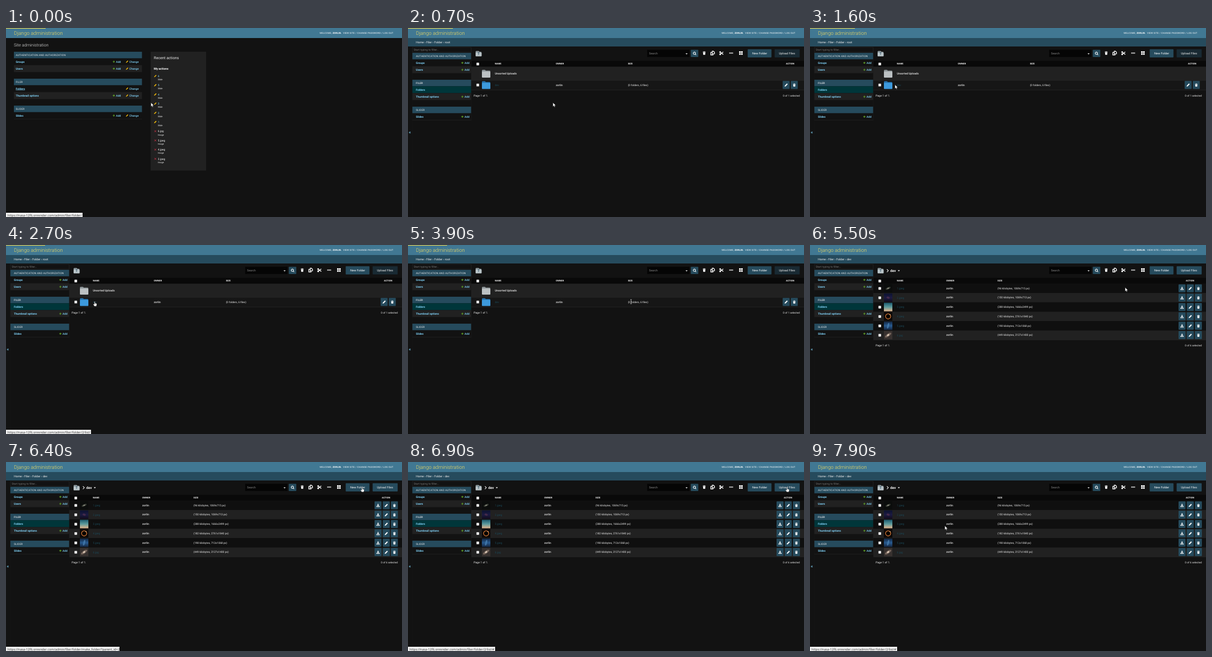
An HTML page that plays this animation: 750 px wide and 358 px high, repeating every 8 s.

```html
<!DOCTYPE html>
<html lang="en">
<head>
<meta charset="utf-8">
<title>Site administration</title>
<style>
html, body { margin: 0; width: 100%; height: 100%; overflow: hidden; background: #121212; }
svg { display: block; width: 100vw; height: 100vh; }
text { font-family: Roboto, sans-serif; text-rendering: geometricPrecision; white-space: pre; }
.url { font-family: "Open Sans", sans-serif; }
</style>
</head>
<body>
<svg id="stage" viewBox="0 0 750 358"></svg>
<script>
const LINK = '#81d4fa', TEXT = '#eeeeee', BAR = '#264b5d', PANEL = '#212121', DIM = '#1b4655';
const USER = 'zorlin';
const LOOP = 8000, STEP = 100;

const rect = (x, y, w, h, fill, extra = '') =>
  `<rect x="${x}" y="${y}" width="${w}" height="${h}" fill="${fill}" ${extra}/>`;

// y is the vertical middle of lower-case text
const text = (x, y, str, { size = 5.2, fill = TEXT, weight = 400, space = 0, extra = '' } = {}) =>
  `<text x="${x}" y="${y + size * 0.35}" font-size="${size}" fill="${fill}" font-weight="${weight}" letter-spacing="${space}" ${extra}>${str}</text>`;

const link = (x, y, str, extra = '') => text(x, y, str, { fill: LINK, weight: 700, extra });
const caps = (x, y, str, weight = 400) => text(x, y, str, { size: 4.8, space: 0.2, weight });
const head = (x, y, str) => text(x, y, str, { size: 4.4, weight: 700 });

// icon outlines in a box from -5 to 5
const fills = {
  pencil: 'M-5 5L-4 1.5 2.5-5 5-2.5-1.5 4Z',
  trash: 'M-4-4h2.5l.5-1h2l.5 1H4v1.2H-4ZM-3.4-2h6.8l-.5 7h-5.8Z',
  load: 'M-1.2-5h2.4v4H4L0 3-4-1h2.8ZM-5 2h2l3 2.2 3-2.2h2v3H-5Z',
  grid: 'M-5-5h4.5v4.5H-5ZM.5-5H5v4.5H.5ZM-5 .5h4.5V5H-5ZM.5 .5H5V5H.5Z',
  dots: 'M-5-1.3h2.6v2.6h-2.6ZM-1.3-1.3h2.6v2.6h-2.6ZM2.4-1.3H5v2.6H2.4Z',
  plus: 'M-1-5h2v4h4v2h-4v4h-2v-4h-4v-2h4Z',
  caret: 'M-5-2.5H5L0 3Z'
};
const strokes = {
  search: 'M2 2L5 5M3-1a4 4 0 1 1-8 0a4 4 0 1 1 8 0',
  copy: 'M-1-5H2L5-2V2H-1ZM-1-2H-5V5H1V2',
  cut: 'M-2.5-2L5 3.5M-2.5 2L5-3.5M-2-3a1.5 1.5 0 1 1-3 0a1.5 1.5 0 1 1 3 0M-2 3a1.5 1.5 0 1 1-3 0a1.5 1.5 0 1 1 3 0',
  cross: 'M-4-4L4 4M4-4L-4 4',
  chevron: 'M-2.5-5L2.5 0-2.5 5'
};
const icon = (name, x, y, size, color = '#fff') =>
  `<path transform="translate(${x} ${y}) scale(${size / 10})" ` + (fills[name]
    ? `d="${fills[name]}" fill="${color}"/>`
    : `d="${strokes[name]}" fill="none" stroke="${color}" stroke-width="1.9"/>`);

const add = (x, y) => icon('plus', x, y, 4.2, '#70bf2b') + text(x + 4, y, 'Add', { fill: LINK, weight: 500 });
const change = y => icon('pencil', 229.3, y, 4.4, '#efb80b') + text(233.5, y, 'Change', { fill: LINK, weight: 500 });
const checkbox = y => rect(129.7, y - 2.4, 4.9, 4.9, '#fff', 'stroke="#777" stroke-width=".4" rx=".6"');
const actionButton = (name, x, y) => rect(x, y - 7.6, 13.2, 15.2, BAR, 'rx="1"') + icon(name, x + 6.6, y + .3, 6);

const folder = (x, y, back, front) =>
  `<path d="M${x} ${y + 2}q0-1.6 1.4-1.6h4.4l1.6 1.6h7q1.4 0 1.4 1.4v10.4h-15.8z" fill="${back}"/>` +
  rect(x, y + 3.6, 16, 11.6, front, 'rx="1.2"');

const header = rect(0, 0, 750, 19, '#417893') +
  text(15, 9.8, 'Django administration', { size: 9.6, fill: '#f5dd5d', weight: 300 }) +
  text(594, 9.6, 'WELCOME,', { size: 4.4, space: .2, fill: '#fff' }) +
  text(618.4, 9.6, USER.toUpperCase() + '.', { size: 4.4, space: .1, fill: '#fff', weight: 700 }) +
  text(638.4, 9.6, 'VIEW SITE / CHANGE PASSWORD / LOG OUT', { size: 4.4, space: .2, fill: '#fff' });

function indexPage() {
  let out = text(15, 32.6, 'Site administration', { size: 8, weight: 300 });
  [[45, 'AUTHENTICATION AND AUTHORIZATION'], [96, 'FILER'], [147, 'SLIDER']].forEach(([y, s]) => {
    out += rect(15, y, 242.5, 12.3, BAR) + caps(18.5, y + 6.2, s);
  });
  out += rect(15, 70.3, 242.5, 13.2, PANEL) + rect(15, 121.4, 242.5, 13.2, PANEL);
  out += rect(15, 172, 242.5, .5, '#2a2a2a');
  [['Groups', 63.8], ['Users', 77], ['Folders', 114.8], ['Thumbnail options', 128], ['Slides', 165.8]].forEach(([s, y]) => {
    const hovered = s === 'Folders';
    out += link(18.5, y, s, hovered ? 'text-decoration="underline"' : '') + change(y);
    if (!hovered) out += add(204.2, y);
  });
  out += rect(274, 45, 105, 225, PANEL) +
    text(280, 56.3, 'Recent actions', { size: 7.2 }) +
    text(280, 77.2, 'My actions', { size: 5.6, weight: 700, fill: '#fff' });
  ['6', '5', '4', '3', '2', '1', '6.jpg', '5.jpeg', '4.jpeg', '3.jpeg'].forEach((s, i) => {
    const y = 91 + i * 17.42, removed = s.length > 1;
    out += removed ? icon('cross', 282.8, y, 4.2, '#e0344a') : icon('pencil', 282.8, y, 4.6, '#efb80b');
    out += text(287.4, y, s, { fill: removed ? TEXT : LINK }) +
      text(287.4, y + 6.6, removed ? 'Image' : 'Slide', { size: 4.2 });
  });
  return out;
}

function sidebar() {
  let out = rect(7.8, 35, .5, 323, '#1b1b1b') + rect(119.6, 35, .5, 140, '#222') +
    rect(8.3, 36.8, 111.2, 9, '#121212', 'stroke="#2d2d2d" stroke-width=".5"') +
    text(10.8, 41.3, 'Start typing to filter...', { fill: '#777' });
  [[47, 'AUTHENTICATION AND AUTHORIZATION'], [98, 'FILER'], [149, 'SLIDER']].forEach(([y, s]) => {
    out += rect(8.3, y, 111.2, 12.3, BAR) + caps(15, y + 6.2, s, s === 'FILER' ? 500 : 400);
  });
  out += rect(8.3, 72.5, 111.2, 13, PANEL) + rect(8.3, 110.4, 111.2, 12.8, '#00363a') +
    rect(8.3, 123.4, 111.2, 13, PANEL) + rect(8.3, 174.2, 111.2, .5, '#2a2a2a');
  [['Groups', 66], ['Users', 79.2], ['Folders', 117], ['Thumbnail options', 130.2], ['Slides', 168]].forEach(([s, y]) => {
    out += link(15, y, s);
    if (s !== 'Folders') out += add(103, y);
  });
  return out + text(1.4, 197.4, '«', { size: 8, fill: LINK, weight: 700 });
}

function filerFrame(crumb, uploadFill) {
  return rect(0, 19, 750, 16, BAR) +
    text(15, 27, `Home › Filer › Folder › ${crumb}`, { size: 5.6 }) + sidebar() +
    folder(128, 43, '#8b979c', '#b9c4c8').replace(/16"/, '11.4"').replace(/h-15.8z/, 'h-11z').replace('h7q', 'h2.4q')
      .replace(/11\.6"/, '6.8"').replace('v10.4', 'v7') +
    `<path d="M133.7 46v5M132.2 47.5l1.5-1.5 1.5 1.5" fill="none" stroke="${BAR}" stroke-width=".8"/>` +
    rect(453, 41.3, 80, 13.6, '#050505') + text(456.6, 48.2, 'Search', { size: 5.3, fill: '#888' }) +
    icon('caret', 527.6, 48.9, 4) +
    rect(535.6, 41.3, 14.2, 13.6, BAR, 'rx="1"') + icon('search', 543, 48.4, 5.6) +
    icon('trash', 561, 47.5, 6.6) + icon('copy', 577, 47.5, 7) + icon('cut', 593.7, 47.7, 7) +
    icon('dots', 612, 47.5, 7) + icon('grid', 630.5, 47.3, 6.8) +
    rect(643.4, 40.3, 45, 15.4, BAR, 'rx="1"') + text(652, 48.1, 'New Folder', { size: 5.6, fill: '#fff' }) +
    rect(694.4, 40.3, 47.4, 15.4, uploadFill, 'rx="1"') + text(702.5, 48.1, 'Upload Files', { size: 5.6 }) +
    rect(120, 62.3, 630, 11, '#090909') + checkbox(68.2) + head(164.4, 67.8, 'NAME');
}

function rootPage() {
  return filerFrame('root', '#192a33') +
    head(280, 67.8, 'OWNER') + head(416.4, 67.8, 'SIZE') + head(715.8, 67.8, 'ACTION') +
    rect(120, 73.3, 630, 26, PANEL) + rect(120, 99.3, 630, 18.2, '#161616') +
    rect(120, 99, 630, .5, '#2b2b2b') + rect(120, 117.2, 630, .5, '#303030') +
    folder(140, 78.8, '#8f979a', '#bcc1c3') + text(164.4, 86, 'Unsorted Uploads', { weight: 500 }) +
    checkbox(108) + folder(140, 100.3, '#2673ad', '#3d9add') +
    text(164.4, 108, 'dev', { fill: DIM }) +
    text(280, 107.8, USER, { weight: 500 }) + text(416.4, 107.8, '(0 folders, 6 files)', { size: 5 }) +
    actionButton('pencil', 709.6, 107.8) + actionButton('trash', 725, 107.8) +
    text(124.2, 128, 'Page 1 of 1.') + text(710, 128, '0 of 1 selected', { size: 4.9 });
}

const rowY = i => 82 + i * 17.74;

function devPage() {
  const files = [['1.jpeg', '96', '1069x715'], ['2.jpeg', '150', '1069x713'], ['3.jpeg', '288', '1666x2499'],
    ['4.jpeg', '182', '2761x1840'], ['5.jpeg', '198', '712x1068'], ['6.jpg', '449', '2127x1400']];
  let out = filerFrame('dev', BAR) + icon('chevron', 147, 48.6, 5.4) +
    text(152, 48.4, 'dev', { size: 6.6, weight: 700, fill: '#fff' }) + icon('caret', 168.2, 48.8, 4) +
    head(258, 67.8, 'OWNER') + head(355, 67.8, 'SIZE') + head(711.8, 67.8, 'ACTION');
  files.forEach(([name, kb, px], i) => {
    const y = rowY(i);
    out += rect(120, y - 8.8, 630, 17.74, i % 2 ? PANEL : '#0f0f0f') + checkbox(y + .2) +
      text(164.4, y, name, { fill: DIM }) + text(258, y - .2, USER, { weight: 500 }) +
      text(355, y - .2, `(${kb} kilobytes, ${px} px)`, { size: 5 }) +
      actionButton('load', 698, y) + actionButton('pencil', 713.6, y) + actionButton('trash', 729, y);
  });
  return out + rect(120, 179.6, 630, .5, '#303030') +
    text(124.2, 190.6, 'Page 1 of 1.') + text(710, 190.6, '0 of 6 selected', { size: 4.9 });
}

const gradient = (id, ...stops) => `<linearGradient id="${id}" x1="0" y1="0" x2="0" y2="1">` +
  stops.map((c, i) => `<stop offset="${i / (stops.length - 1)}" stop-color="${c}"/>`).join('') + '</linearGradient>';
const blob = (rx, ry, fill, turn = 0, extra = '') =>
  `<ellipse rx="${rx}" ry="${ry}" fill="${fill}" transform="rotate(${turn})" ${extra}/>`;

function thumbnails() {
  const art = [
    ['#0b0d0c', blob(5, 1.8, '#3b4037', -25) + blob(2, .9, '#98958a', -25)],
    ['url(#night)', blob(3, 2, '#53304f', 20, 'opacity=".7"')],
    ['url(#dusk)', ''],
    ['#0d0908', blob(4.8, 4.8, '#000', 0, 'stroke="#db7b37" stroke-width="1.3"') + blob(1, .7, '#ffe1b5', 0, 'cx="3.5" cy="-3.3"')],
    ['url(#nebula)', blob(1.7, 5.5, '#4c83b5', 15, 'opacity=".7"')],
    ['#37312f', blob(7, 2.6, '#77675d', -35) + blob(2.4, 1.4, '#e2cfbc', -35)]
  ];
  return '<defs>' + gradient('night', '#0c1230', '#1c1b42', '#120c1d') +
    gradient('dusk', '#1c5b70', '#5b9a9c', '#e2b58d') + gradient('nebula', '#122540', '#285b91', '#14243d') + '</defs>' +
    art.map(([bg, shape], i) =>
      `<g transform="translate(148 ${rowY(i)})">${rect(-8, -8, 16, 16, bg)}${shape}</g>`).join('');
}

const cursors = {
  arrow: '<path d="M0 0V7.2L1.7 5.7 2.8 8.2 4 7.7 2.9 5.2H5.2Z" fill="#fff" stroke="#222" stroke-width=".4"/>',
  hand: '<path d="M-.7 0Q0-.6 .7 0V3L3.4 3.6Q4 3.8 4 4.6L3.2 8.6H-.6L-2.8 5.2Q-2.7 4.2-1.6 4.6L-.7 5.3Z" fill="#fff" stroke="#222" stroke-width=".4"/>',
  beam: '<path d="M-1.3-4H1.3M0-4V4M-1.3 4H1.3" fill="none" stroke="#ddd" stroke-width=".7"/>'
};
const group = (id, body) => `<g id="${id}">${body}</g>`;

document.getElementById('stage').innerHTML = rect(0, 0, 750, 358, '#121212') + header +
  group('index', indexPage()) + group('root', rootPage()) + group('dev', devPage()) + group('thumbs', thumbnails()) +
  rect(0, 0, 75, 1.1, '#f0d84e', 'id="progress"') +
  group('status', rect(0, 350, 10, 8, '#f1f1f1', 'id="statusBox"') +
    text(3, 354.9, '', { size: 5.9, fill: '#333', extra: 'id="url" class="url"' })) +
  group('pointer', Object.entries(cursors).map(([k, v]) => group(k, v)).join(''));

const el = id => document.getElementById(id);
const show = (id, on) => el(id).setAttribute('display', on ? 'inline' : 'none');

const BASE = 'https://nasa-12f6.onrender.com/admin/filer/folder/';
const pages = [[0, 'index'], [100, 'root'], [4600, 'dev']];
const progress = [[0, 75], [100, 85], [2500, 74], [4300, 84], [5200, 0]];
const statuses = [[0, '', 145], [100, null], [1900, '2/list/', 161], [2900, null],
  [5700, 'make_folder/?parent_id=2', 215], [6900, '2/list/#', 165]];
const moves = [
  [0, 274.6, 141.5, 'arrow'], [1000, 274.6, 141.5, 'arrow'], [1300, 160, 115, 'arrow'], [1500, 160, 115, 'arrow'],
  [1600, 161, 107.6, 'arrow'], [1800, 161, 107.6, 'arrow'], [1900, 168, 107.3, 'hand'], [2800, 168, 107.3, 'arrow'],
  [3800, 422.4, 107.3, 'beam'], [4600, 422.4, 107.3, 'arrow'], [4800, 519.4, 113, 'arrow'], [5300, 519.4, 113, 'arrow'],
  [5700, 674.4, 48.2, 'hand'], [6600, 674.4, 48.2, 'hand'], [6900, 718, 48.2, 'hand'], [7400, 718, 48.2, 'arrow'],
  [7900, 255.4, 121, 'arrow'], [8000, 255.4, 121, 'arrow']
];
const at = (table, t) => table.filter(row => row[0] <= t).pop();

function draw(t) {
  const page = at(pages, t)[1];
  pages.forEach(([, id]) => show(id, id === page));
  show('thumbs', t >= 5000);
  el('progress').setAttribute('width', at(progress, t)[1]);

  const [, path, width] = at(statuses, t);
  show('status', path !== null);
  if (path !== null) {
    el('url').textContent = BASE + path;
    el('statusBox').setAttribute('width', width);
  }

  const from = at(moves, t), to = moves[moves.indexOf(from) + 1];
  const p = (t - from[0]) / (to[0] - from[0]), ease = p * p * (3 - 2 * p);
  const mix = i => from[i] + (to[i] - from[i]) * ease;
  el('pointer').setAttribute('transform', `translate(${mix(1)} ${mix(2)})`);
  Object.keys(cursors).forEach(k => show(k, k === from[3]));
}

const start = performance.now();
function tick() {
  const t = (performance.now() - start) % LOOP;
  draw(Math.floor(t / STEP) * STEP);
  requestAnimationFrame(tick);
}
tick();
</script>
</body>
</html>
```
